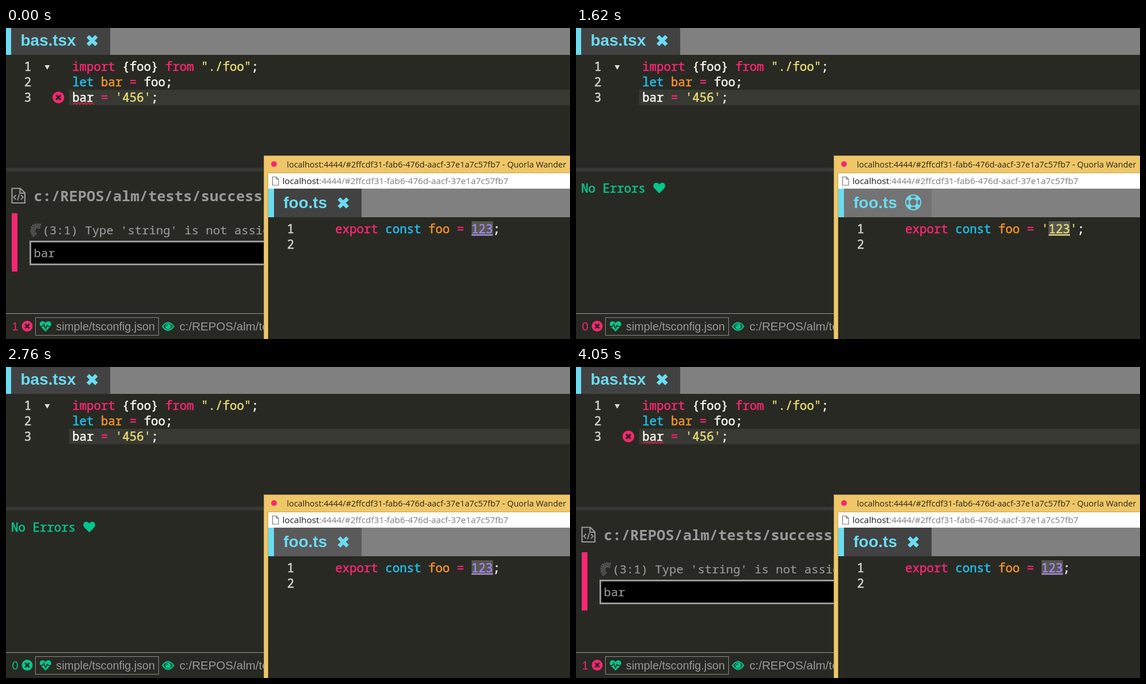
Write an HTML page that moves like this. It is 985x544 px and loops after 5.04 s.

```html
<!DOCTYPE html>
<html lang="en">
<head>
<meta charset="utf-8">
<title>Live type errors across two editors</title>
<style>
  html, body { margin: 0; width: 100%; height: 100%; overflow: hidden; background: #282923; }
  svg { display: block; width: 985px; height: 544px; }
  text { white-space: pre; }
  .mono { font: 20.83px "Noto Sans Mono", "DejaVu Sans Mono", monospace; color: #f8f8f2; stroke-width: .55; }
  .mono, .mono text, .mono tspan { fill: currentColor; stroke: currentColor; }
  .mono rect { stroke: none; }
  .num { color: #d4d4cc; text-anchor: middle; }
  .msg { font-size: 20.7px; color: #999; stroke-width: .2; }
  .path { font-size: 25.6px; font-weight: 700; color: #999; stroke-width: 0; }
  .tab { font: 700 28px "Liberation Sans", Arial, sans-serif; fill: #6bdcf2; }
  .status { font: 19.8px "Liberation Sans", Arial, sans-serif; fill: #999; }
  .folder { font-size: 20.6px; }
  .chrome { font: 14.47px "Open Sans", "Noto Sans", sans-serif; fill: #2b2618; }
  .url { font-size: 15.33px; fill: #7d7d7d; }
  .host { fill: #1c1c1c; }
  .pink, .blue, .orange, .str, .number, .green { fill: currentColor; }
  .plain { color: #f8f8f2; }
  .pink { color: #f92672; }
  .blue { color: #1cc2f0; }
  .orange { color: #f3922a; }
  .str { color: #e6db74; }
  .number { color: #a586ea; }
  .green { color: #04c78d; }
  .count text { fill: inherit; }
  .line { fill: none; }
</style>
</head>
<body>
<svg viewBox="0 0 985 544" xml:space="preserve">
  <defs>
    <linearGradient id="split" x2="0" y2="1">
      <stop offset="0" stop-color="#30312d"/>
      <stop offset=".5" stop-color="#3c3c3a"/>
      <stop offset="1" stop-color="#2b2c28"/>
    </linearGradient>
    <path id="close" class="line" stroke="#6bdcf2" stroke-width="6.6" d="M-7.5-7.5 7.5 7.5M7.5-7.5-7.5 7.5"/>
    <path id="heart" d="M0 9-8.6.3C-11-2.5-10.6-9-5-9-2.5-9-.8-7.3 0-6 .8-7.3 2.5-9 5-9 10.6-9 11-2.5 8.6.3Z"/>
    <g id="badge">
      <circle r="10.3"/>
      <path class="line" stroke="#282923" stroke-width="3.2" d="M-4-4 4 4M4-4-4 4"/>
    </g>
  </defs>

  <rect width="985" height="544" fill="#282923"/>

  <!-- main editor -->
  <rect width="985" height="47" fill="#808080"/>
  <rect width="182" height="47" fill="#424242"/>
  <rect width="9" height="47" fill="#6bdcf2"/>
  <text class="tab" x="25.5" y="31">bas.tsx</text>
  <use href="#close" x="150.5" y="22"/>
  <rect x="110" y="108" width="875" height="27" fill="#383933"/>
  <g class="mono">
    <text class="num" x="38" y="75">1</text>
    <text class="num" x="38" y="102">2</text>
    <text class="num" x="38" y="129">3</text>
    <text x="115.7" y="75"><tspan class="pink">import</tspan> {foo} <tspan class="pink">from</tspan> <tspan class="str">"./foo"</tspan>;</text>
    <text x="115.7" y="102"><tspan class="blue">let</tspan> <tspan class="orange">bar</tspan> <tspan class="pink">=</tspan> foo;</text>
    <text x="115.7" y="129">bar <tspan class="pink">=</tspan> <tspan class="str">'456'</tspan>;</text>
  </g>
  <path d="M67.5 65h9L72 73Z" fill="#dcdcd4"/>
  <rect y="244" width="985" height="8" fill="url(#split)"/>

  <!-- error panel -->
  <g id="errors">
    <use href="#badge" class="pink" x="91.5" y="121.5"/>
    <path id="squiggle" class="line" stroke="#e3204c" stroke-width="1.5"/>
    <g class="line" stroke="#999" stroke-width="2.2">
      <path d="M10.5 280.5h14.5l8 8v17.5h-22.5ZM24.5 281v8h8.5"/>
      <path stroke-width="1.8" d="M17.5 292l-4 4 4 4M26 292l4 4-4 4M23.3 290.5l-3 11"/>
    </g>
    <text class="mono path" x="48.5" y="303">c:/REPOS/alm/tests/success</text>
    <rect x="10" y="324" width="10" height="102" fill="#f92672"/>
    <g class="line">
      <path stroke="#8a8a86" stroke-width="9" stroke-dasharray="1 1.6" d="M60 347Q47 344 47 354Q47 359 51 363"/>
      <path stroke="#4c4d49" stroke-width="5" d="M60 347Q47 344 47 354Q47 359 51 363"/>
    </g>
    <text class="mono msg" x="63.5" y="361">(3:1) Type 'string' is not assignable</text>
    <rect x="42.5" y="373.5" width="440" height="40" fill="#000" stroke="#999" stroke-width="3"/>
    <text class="mono msg" x="48.5" y="401">bar</text>
  </g>
  <g id="clean">
    <text class="mono green" x="9" y="288">No Errors</text>
    <use href="#heart" class="green" transform="translate(145.5 280) scale(1.03)"/>
  </g>

  <!-- status bar -->
  <rect y="499" width="985" height="1" fill="#999"/>
  <g id="count" class="count" fill="#f92672">
    <text id="one" class="status" x="10.5" y="529">1</text>
    <text id="zero" class="status" x="10.5" y="529">0</text>
    <use href="#badge" transform="translate(37 521.5) scale(.92)"/>
  </g>
  <rect class="line" x="51.5" y="506.5" width="215" height="31" stroke="#8c8c8a"/>
  <use href="#heart" class="green" x="69" y="522"/>
  <path class="line" stroke="#282923" stroke-width="1.7" d="M58 522h6l2-4 3 8 3-6 1.5 2h7"/>
  <text class="status" x="87.5" y="529">simple/tsconfig.json</text>
  <g transform="translate(283 522)">
    <path class="line" stroke="#04c78d" stroke-width="2.2" d="M-9.6 0Q0-13.5 9.6 0 0 13.5-9.6 0Z"/>
    <circle class="green" r="5"/>
    <path class="line" stroke="#282923" stroke-width="1.3" d="M-2.6 0A2.6 2.6 0 0 1 0-2.6"/>
  </g>
  <text class="status folder" x="303" y="529">c:/REPOS/alm/tests</text>

  <!-- browser window -->
  <rect x="450" y="223" width="535" height="321" fill="#efc768"/>
  <path class="line" stroke="#b0914a" d="M450.5 544V223.5H985"/>
  <path class="line" stroke="#c4a356" d="M457.5 544V253.5H985"/>
  <circle class="pink" cx="468" cy="238" r="5"/>
  <text class="chrome" x="490.5" y="244">localhost:4444/#2ffcdf31-fab6-476d-aacf-37e1a7c57fb7 - Quorla Wander</text>
  <rect x="458" y="254" width="527" height="27" fill="#fff"/>
  <path class="line" stroke="#777" stroke-width="1.2" d="M465.5 260.5h6.5l4 4v10.5h-10.5ZM472 260.5v4h4"/>
  <text class="chrome url" x="482.7" y="273"><tspan class="host">localhost</tspan>:4444/#2ffcdf31-fab6-476d-aacf-37e1a7c57fb7</text>
  <rect x="458" y="281" width="527" height="50" fill="#808080"/>
  <rect id="tab" x="468" y="281" width="153" height="50" fill="#424242"/>
  <rect x="458" y="281" width="10" height="50" fill="#6bdcf2"/>
  <text class="tab" x="484.5" y="315">foo.ts</text>
  <use id="saved" href="#close" x="589" y="306"/>
  <g id="unsaved" class="line" stroke="#6bdcf2" stroke-width="2" transform="translate(589 305)">
    <circle r="13"/>
    <circle r="7"/>
    <circle r="10" stroke-width="7" pathLength="360" stroke-dasharray="43 47" stroke-dashoffset="-23.5"/>
  </g>
  <rect x="458" y="331" width="527" height="213" fill="#282923"/>
  <g class="mono">
    <text class="num" x="497" y="359">1</text>
    <text class="num" x="497" y="386">2</text>
    <text x="575" y="359"><tspan class="pink">export</tspan> <tspan class="blue">const</tspan> <tspan class="orange">foo</tspan> <tspan class="pink">=</tspan></text>
    <g id="asNumber">
      <rect x="813" y="338" width="37.5" height="26" fill="#56574f"/>
      <text class="number" x="812.8" y="359">123<tspan class="plain">;</tspan></text>
      <rect class="number" x="813" y="361" width="37.5" height="2"/>
    </g>
    <g id="asString">
      <rect x="825.3" y="338" width="37.5" height="26" fill="#56574f"/>
      <text class="str" x="812.8" y="359">'123'<tspan class="plain">;</tspan></text>
      <rect class="str" x="825.3" y="361" width="37.5" height="2"/>
    </g>
  </g>
</svg>
<script>
  const LOOP = 5040;
  const FADE = 300;
  const byId = id => document.getElementById(id);

  const play = (id, frames) => byId(id).animate(
    frames.map(([time, style, easing = 'linear']) => ({ ...style, offset: time / LOOP, easing })),
    { duration: LOOP, iterations: Infinity });

  // Hard swap: one element gives way to another between two times.
  const swap = (normalId, otherId, from, to) => {
    const toggle = (id, outside) => play(id, [
      [0, { opacity: outside }, 'steps(1, end)'],
      [from, { opacity: 1 - outside }, 'steps(1, end)'],
      [to, { opacity: outside }, 'steps(1, end)'],
      [LOOP, { opacity: outside }]
    ]);
    toggle(normalId, 1);
    toggle(otherId, 0);
  };

  const fade = (id, normal, other, from, to) => play(id, [
    [0, { fill: normal }],
    [from, { fill: normal }, 'ease'],
    [from + FADE, { fill: other }],
    [to, { fill: other }, 'ease'],
    [to + FADE, { fill: normal }],
    [LOOP, { fill: normal }]
  ]);

  const zigzag = Array.from({ length: 13 }, (_, i) => `${117 + i * 3} ${i % 2 ? 130.5 : 133.5}`);
  byId('squiggle').setAttribute('d', 'M' + zigzag.join('L'));

  swap('asNumber', 'asString', 450, 2610);
  swap('saved', 'unsaved', 570, 2670);
  fade('tab', '#424242', '#737373', 570, 2670);
  swap('errors', 'clean', 1620, 3750);
  swap('one', 'zero', 1620, 3750);
  fade('count', '#f92672', '#04c78d', 1620, 3750);
</script>
</body>
</html>
```
